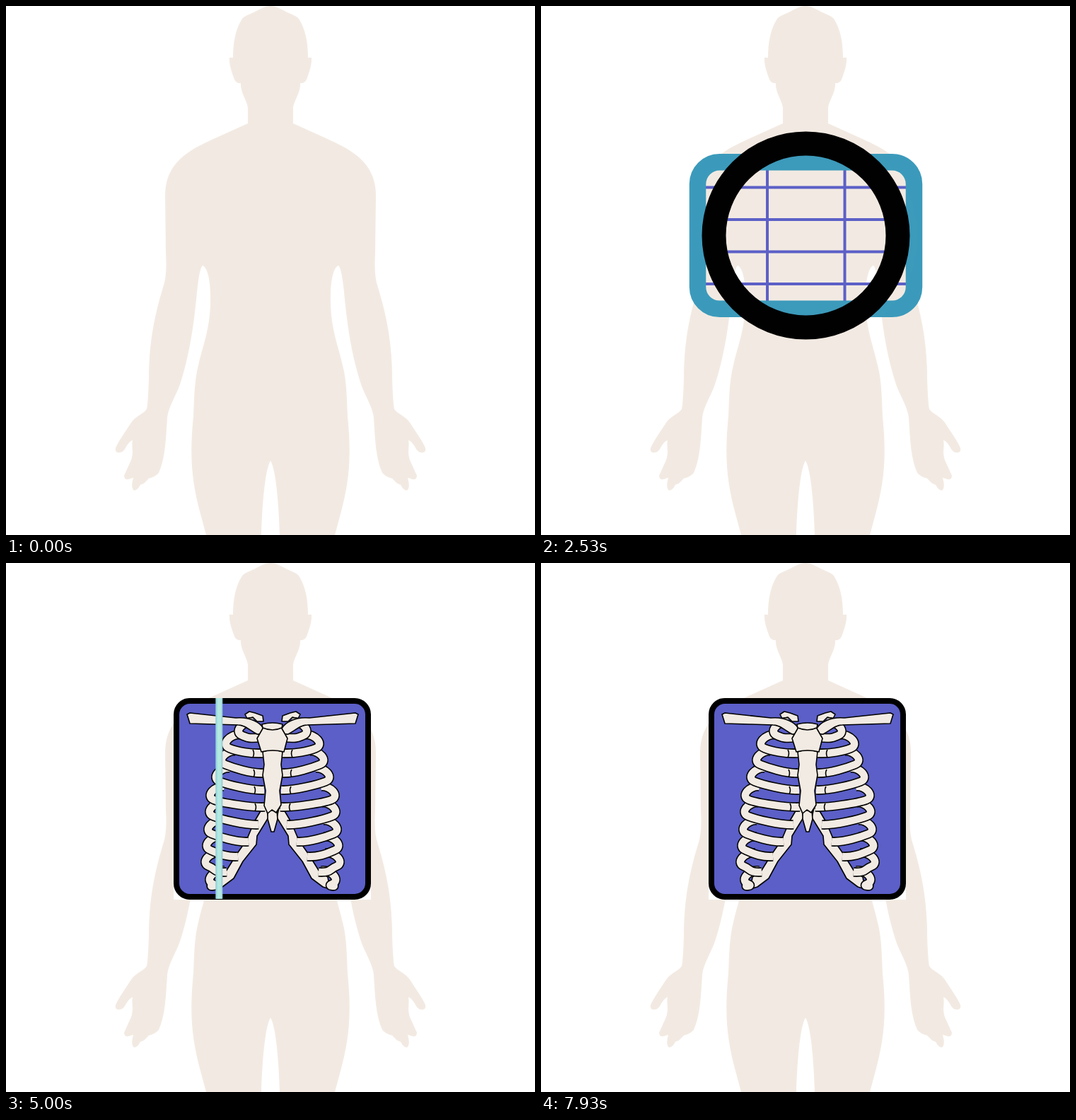
An HTML page that plays this animation: 748 px wide and 748 px high, repeating every 8030 ms.

```html
<!DOCTYPE html>
<html lang="en">
<head>
<meta charset="utf-8">
<title>Chest X-ray</title>
<style>
  html, body { margin: 0; height: 100%; overflow: hidden; background: #fff; }
  svg { display: block; width: 100vw; height: 100vh; }
  .bone { fill: #f2ebe3; stroke: #000; stroke-width: 1.6; stroke-linejoin: round; }
</style>
</head>
<body>
<svg viewBox="0 0 748 748">
  <defs>
    <linearGradient id="glass">
      <stop offset="0" stop-color="#86ccdc"/>
      <stop offset=".35" stop-color="#b4eadf"/>
      <stop offset=".75" stop-color="#b5e6e0"/>
      <stop offset="1" stop-color="#7fc4d6"/>
    </linearGradient>
    <linearGradient id="prism" x2="1" y2=".25">
      <stop offset="0" stop-color="#b9b8ee"/>
      <stop offset=".55" stop-color="#c3b4e6"/>
      <stop offset="1" stop-color="#f0b3b4"/>
    </linearGradient>
    <clipPath id="scanned"><rect id="scannedArea" x="237" y="191" height="285"/></clipPath>
  </defs>

  <g fill="#f2eae2">
    <path id="half" d="M375,0 H374 C366,0 360,4 354,7 C347,11 338,13 334,18
      C325,32 321,50 321,73 L316,73 C315,84 321,98 323,104 Q326,110 332,109
      C331,122 341,134 342,144 V166 L300,185 C268,200 225,216 225,268
      L226,350 Q228,382 222,398 C209,440 202,480 202,525 Q201,560 199,570
      C194,577 183,580 177,589 C168,603 158,617 155,625 C153,632 162,634 167,628
      Q174,615 179,614 C177,622 181,630 177,642 L167,664 Q167,671 174,669
      L180,667 Q176,681 181,685 Q186,685 190,677 L195,675 L202,668 Q211,666 216,660
      C225,640 226,615 228,582 C230,566 240,552 246,535 C259,495 265,455 269,415
      Q273,370 278,367 C286,370 289,392 289,410 C290,455 278,480 272,508
      C266,530 266,560 265,580 C259,640 263,675 276,722 L283,748 H361
      C362,710 366,655 374,643 H375 Z"/>
    <use href="#half" transform="matrix(-1 0 0 1 748 0)"/>
  </g>

  <g id="scanner" fill="none">
    <path stroke="#5b5fc7" stroke-width="4"
      d="M232,256.500H517M232,302H517M232,347.500H517M232,393H517M320,232V418M429.500,232V418"/>
    <rect x="221.500" y="220.800" width="306" height="207.500" rx="31" stroke="#3b9abb" stroke-width="23.500"/>
  </g>

  <circle id="ring" cx="374.500" cy="324.500" fill="none" stroke="#000"/>
  <circle id="flash" cx="377.500" cy="326" r="155" fill="#fffffd"/>

  <rect id="backing" x="237" y="191" width="279" height="285" fill="#fff"/>
  <g id="xray">
    <rect x="241" y="195" width="271" height="277" rx="19" fill="#5b5fc7" stroke="#000" stroke-width="8"/>
    <g id="side">
      <path class="bone" d="M338,214 L344,210 L352,212 L363,216 L364,224 L355,224 L349,218 L341,220Z"/>
      <path class="bone" d="M368,346 L361,349 L351,366 L340,392 L326,412 L311,436 L299,444
        L296,461 L306,458 L322,446 L335,422 L354,398 L355,386 L371,360Z"/>
      <g id="ribs" fill="none"></g>
      <path class="bone" d="M256,214 L260,212 L325,219 C345,217 360,226 364,234 Q364,243 355,242
        C345,237 338,229 328,229 L260,227Z"/>
    </g>
    <use href="#side" transform="matrix(-1 0 0 1 754 0)"/>
    <path class="bone" d="M370,350 H383 L384,362 L379,380 H375 L370,362Z"/>
    <path class="bone" d="M363,267 Q377,262 391,267 L389,285 L391,300 L387,322 L389,342 L382,353
      L376,349 L370,354 L365,343 L367,322 L363,300 L365,285Z"/>
    <path class="bone" d="M362,228 Q377,224 391,228 L390,234 L398,248 L393,267 Q377,263 361,267 L355,248 L363,234Z"/>
    <path class="bone" fill-opacity="0" d="M363,233 Q377,239 390,233"/>
  </g>

  <g id="label" clip-path="url(#scanned)" fill="none">
    <rect x="392" y="331" width="71" height="97" stroke="url(#prism)" stroke-width="5"/>
    <rect x="393" y="332" width="68" height="94" stroke="#e6e2f5" stroke-width="1"/>
    <path d="M394,331H433" stroke="#8ed3e6" stroke-width="4"/>
    <path d="M433,331H441" stroke="#5b5fc7" stroke-width="5"/>
    <rect x="359" y="291" width="103" height="37" rx="16" fill="#45c0e8"/>
    <rect x="362" y="290" width="103" height="36" rx="16" fill="#fbd34b"/>
    <rect x="367" y="285" width="102" height="45" rx="17" stroke="#4aaee0" stroke-width="1.200"/>
    <circle cx="469.500" cy="336" r="3" stroke="#4aaee0" stroke-width="1.500"/>
  </g>
  <rect id="bar" y="191" width="10" height="284" fill="url(#glass)"/>
</svg>

<script>
const LOOP = 8030;
const $ = id => document.getElementById(id);
const set = (id, attrs) => {
  for (const name in attrs) $(id).setAttribute(name, attrs[name]);
};
const show = (id, on) => set(id, { visibility: on ? 'visible' : 'hidden' });
const progress = (t, start, end) => Math.min(1, Math.max(0, (t - start) / (end - start)));
const easeOut = (u, power) => 1 - (1 - u) ** power;

// Outer bend and inner end of each rib, top to bottom
const ribs = [
  [329, 236, 360, 247], [311, 254, 363, 269], [305, 277, 364, 297],
  [297, 301, 365, 321], [289, 327, 366, 345], [288, 350, 357, 370],
  [286, 375, 343, 394], [284, 398, 328, 415], [282, 421, 312, 437],
  [288, 446, 297, 456]
];
$('ribs').innerHTML = ribs.map(([x, y, ex, ey], i) => {
  const d = `M${x + 20},${y - 11}C${x + 6},${y - 13} ${x - 8},${y + 3} ${x + 5},${y + 8}` +
    `C${x + 15},${y + 12} ${ex - 18},${ey + 1} ${ex},${ey}`;
  const joint = i > 0 && i < 5
    ? `<path d="M${ex - 14},${ey - 5}q3,5 0,11" stroke="#000" stroke-width="1.6"/>` : '';
  return `<path d="${d}" stroke="#000" stroke-width="13.6"/>` +
    `<path d="${d}" stroke="#f2ebe3" stroke-width="10.4"/>${joint}`;
}).reverse().join('');

function popScale(t) {
  const age = t - 3400;
  if (age >= 800) return 1;
  return 1 - 0.8 * Math.exp(-age / 215) * Math.cos(Math.PI * age / 228);
}

function draw(t) {
  const covered = t >= 3620;

  const slide = easeOut(progress(t, 0, 500), 3);
  show('scanner', t >= 30 && !covered);
  set('scanner', { transform: `translate(${-54 * (1 - slide)})`, opacity: slide });

  const open = progress(t, 700, 1500);
  const outer = 147 * easeOut(open, 5);
  const inner = 113 * easeOut(open, 3);
  show('ring', t >= 700 && !covered);
  set('ring', { r: (outer + inner) / 2, 'stroke-width': Math.max(0, outer - inner) });

  show('flash', !covered);
  set('flash', { opacity: progress(t, 2530, 2770) });

  show('backing', t >= 4230);
  show('xray', t >= 3400);
  set('xray', { transform: `translate(376 333) scale(${popScale(t)}) translate(-376 -333)` });

  const barX = 237 + 269 * progress(t, 4470, 5700) ** 1.8;
  show('bar', t >= 4470 && t < 5870);
  set('bar', { x: barX });
  set('scannedArea', { width: barX - 237 });
  show('label', t >= 4470);
  set('label', { opacity: 1 - progress(t, 7570, 7930) });
}

function tick() {
  draw(performance.now() % LOOP);
  requestAnimationFrame(tick);
}
tick();
</script>
</body>
</html>
```
